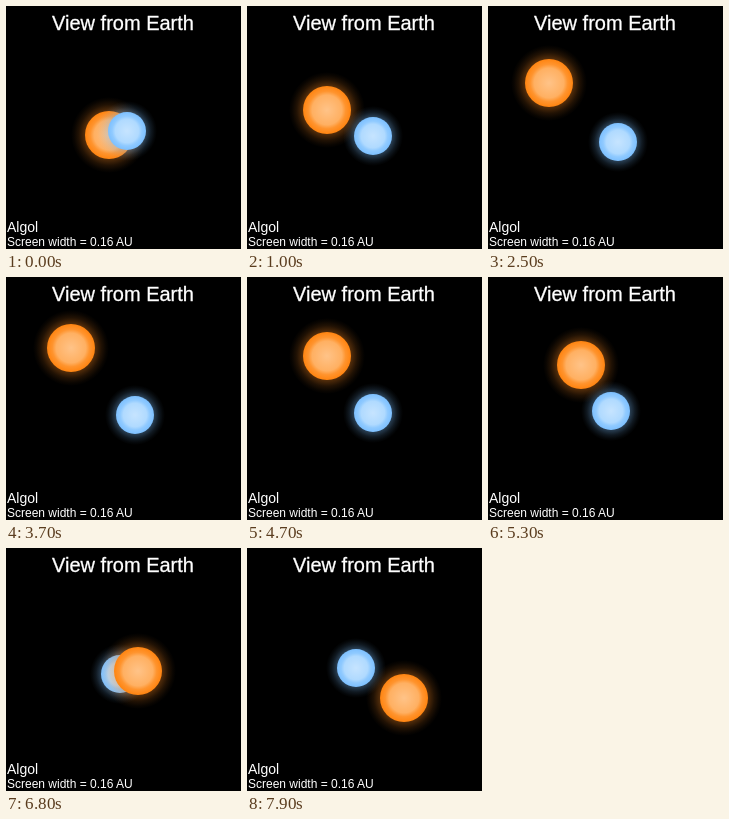
An HTML page for the animation above (8000 ms loop, 235x243 px).

```html
<!DOCTYPE html>
<html lang="en">
<head>
<meta charset="utf-8">
<title>View from Earth</title>
<style>
  html, body { margin: 0; width: 100%; height: 100%; overflow: hidden; background: #000; }
  svg { display: block; width: 235px; height: 243px; }
  text { fill: #fff; font-family: "Liberation Sans", Arial, sans-serif; }
  .title { font-size: 20px; stroke: #fff; stroke-width: .3px; }
</style>
</head>
<body>
<svg viewBox="0 0 235 243">
  <defs>
    <radialGradient id="warmDisc">
      <stop offset="0" stop-color="#ffc388"/>
      <stop offset=".62" stop-color="#ffb062"/>
      <stop offset=".78" stop-color="#ff942e"/>
      <stop offset="1" stop-color="#ff8410"/>
    </radialGradient>
    <radialGradient id="warmGlow">
      <stop offset=".64" stop-color="#ff8a20" stop-opacity=".32"/>
      <stop offset=".8" stop-color="#ff8a20" stop-opacity=".13"/>
      <stop offset=".92" stop-color="#ff8a20" stop-opacity=".04"/>
      <stop offset="1" stop-color="#ff8a20" stop-opacity="0"/>
    </radialGradient>
    <radialGradient id="coolDisc">
      <stop offset="0" stop-color="#c6e4ff"/>
      <stop offset=".62" stop-color="#b0daff"/>
      <stop offset=".78" stop-color="#90caff"/>
      <stop offset="1" stop-color="#7dc0ff"/>
    </radialGradient>
    <radialGradient id="coolGlow">
      <stop offset=".64" stop-color="#7dc0ff" stop-opacity=".32"/>
      <stop offset=".8" stop-color="#7dc0ff" stop-opacity=".13"/>
      <stop offset=".92" stop-color="#7dc0ff" stop-opacity=".04"/>
      <stop offset="1" stop-color="#7dc0ff" stop-opacity="0"/>
    </radialGradient>
  </defs>
  <rect width="235" height="243"/>
  <g id="sky">
    <g id="warm">
      <circle r="38" fill="url(#warmGlow)"/>
      <circle r="24" fill="url(#warmDisc)"/>
    </g>
    <g id="cool">
      <circle r="30" fill="url(#coolGlow)"/>
      <circle r="19" fill="url(#coolDisc)"/>
    </g>
  </g>
  <text class="title" x="117" y="24" text-anchor="middle">View from Earth</text>
  <text x="1" y="226" font-size="14">Algol</text>
  <text x="1" y="240" font-size="12">Screen width = 0.16 AU</text>
</svg>
<script>
  const LOOP = 8000, STEP = 100;
  const OMEGA = 0.000464;                 // orbital speed, radians per ms
  const CENTER = { x: 117.4, y: 125.4 };  // barycenter
  const MASS_RATIO = 0.223;
  const SWAP_TIME = 3200;                 // the stars trade depth while far apart

  const [sky, warm, cool] = ["sky", "warm", "cool"].map(id => document.getElementById(id));

  const swing = (t, size, peak) => -size * Math.cos(OMEGA * (t - peak));

  // Stars sit on whole pixels.
  function place(star, dx, dy) {
    const x = Math.round(CENTER.x + dx), y = Math.round(CENTER.y + dy);
    star.setAttribute("transform", `translate(${x} ${y})`);
  }

  function draw(t) {
    const dx = swing(t, 57.2, 2855), dy = swing(t, 54.6, 3520);
    place(warm, dx, dy);
    place(cool, -MASS_RATIO * dx, -MASS_RATIO * dy);
    const front = t < SWAP_TIME ? cool : warm;
    if (sky.lastElementChild !== front) sky.append(front);
  }

  const start = performance.now();
  function tick() {
    const t = (performance.now() - start) % LOOP;
    draw(Math.floor(t / STEP) * STEP);
    requestAnimationFrame(tick);
  }
  tick();
</script>
</body>
</html>
```
